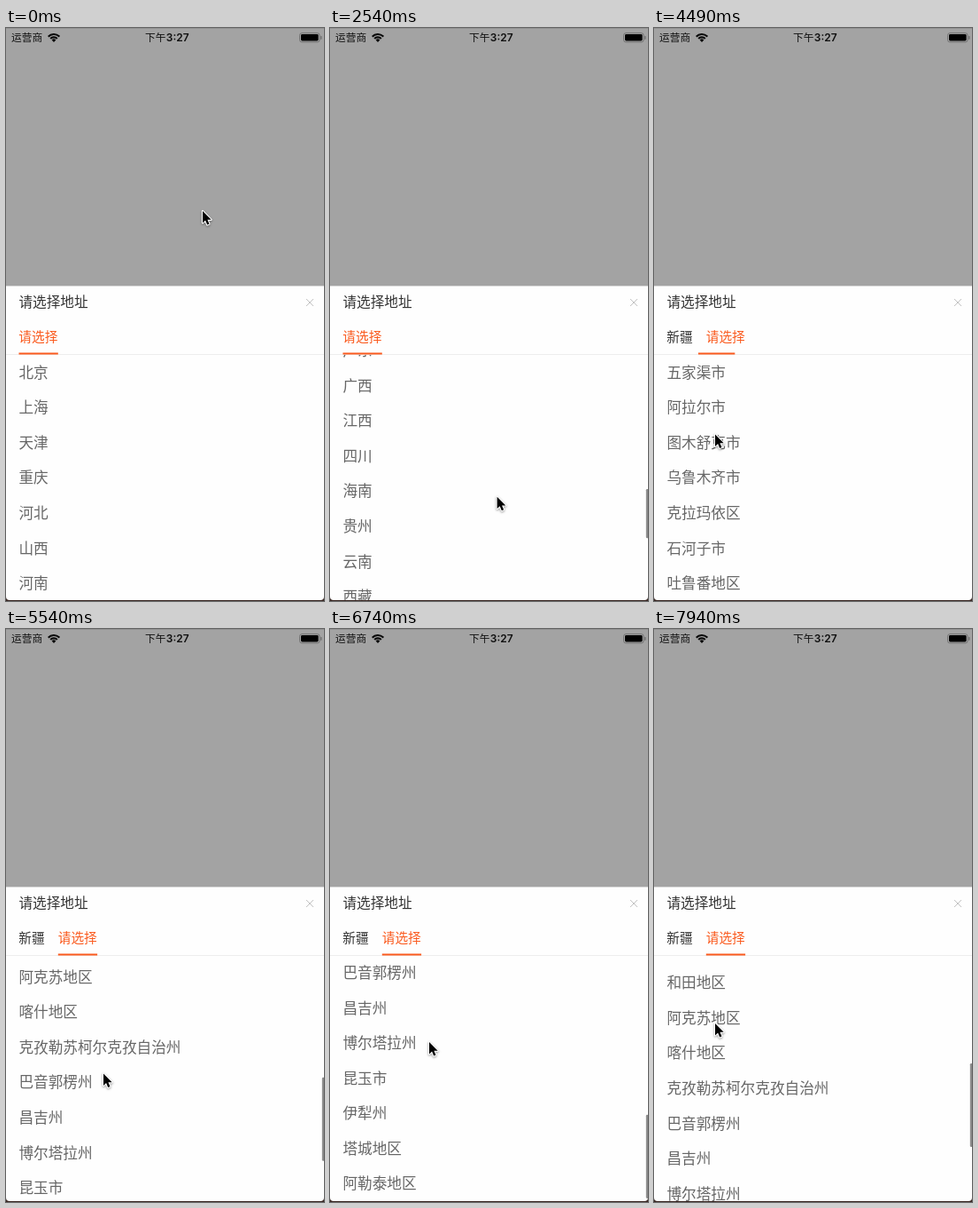
Recreate the animation shown at these times as an HTML page with a canvas. Size 359 px wide and 645 px high, loop 8000 ms.

```html
<!DOCTYPE html>
<html lang="zh-CN">
<head>
<meta charset="utf-8">
<title>请选择地址</title>
<style>
html, body { margin: 0; width: 100%; height: 100%; overflow: hidden; background: #3a2824; }
canvas { display: block; width: 359px; height: 645px; }
</style>
</head>
<body>
<canvas id="stage" width="359" height="645"></canvas>
<script>
const W = 359, H = 645, LOOP = 8000, ROW = 39.55;
const LIST_TOP = 368, LIST_BOTTOM = 644, VIEW = LIST_BOTTOM - LIST_TOP;
const ORANGE = '#fa5a1e', DARK = '#333', GRAY = '#666', INK = '#0a0a0a';
const CJK = '"Noto Sans CJK SC", "Noto Sans CJK", "Noto Sans", sans-serif';
const LATIN = 'Inter, sans-serif';
const ctx = document.getElementById('stage').getContext('2d');

const provinces = ('北京 上海 天津 重庆 河北 山西 河南 辽宁 吉林 黑龙江 内蒙古 江苏 山东 安徽 浙江 福建 湖北 湖南 ' +
  '广东 广西 江西 四川 海南 贵州 云南 西藏 陕西 甘肃 青海 宁夏 新疆 台湾 钓鱼岛 港澳').split(' ');
const cities = ('五家渠市 阿拉尔市 图木舒克市 乌鲁木齐市 克拉玛依区 石河子市 吐鲁番地区 铁门关市 哈密地区 和田地区 ' +
  '阿克苏地区 喀什地区 克孜勒苏柯尔克孜自治州 巴音郭楞州 昌吉州 博尔塔拉州 昆玉市 伊犁州 塔城地区 阿勒泰地区').split(' ');

const clamp = v => Math.max(0, Math.min(1, v));
const ease = v => { v = clamp(v); return v * v * (3 - 2 * v); };
const span = (t, from, length) => clamp((t - from) / length);
const maxScroll = items => items.length * ROW - VIEW;

// A swipe that starts fast and coasts to rest
const flick = (t, from, length, distance) => distance * (1 - (1 - span(t, from, length)) ** 2);

function provinceScroll(t) {
  const first = 451;
  return flick(t, 900, 900, first) + flick(t, 2300, 900, maxScroll(provinces) - first);
}

function cityScroll(t) {
  const bounce = 7;
  return flick(t, 4940, 1200, maxScroll(cities) + bounce) - flick(t, 6140, 300, bounce) -
    flick(t, 6800, 1200, 170);
}

// Pointer stops: [time, x, y]
const stops = [
  [300, 222, 206], [900, 198, 550], [1640, 195, 468], [2300, 192, 550], [2990, 180, 470],
  [3440, 51, 520], [3740, 51, 507], [4040, 51, 507], [4490, 69, 457.5], [4940, 105, 550],
  [6140, 115, 451], [7340, 109, 479], [7940, 69, 444]
];

function pointerAt(t) {
  const next = stops.findIndex(s => s[0] >= t);
  if (next < 1) return stops[0].slice(1);
  const [t0, x0, y0] = stops[next - 1], [t1, x1, y1] = stops[next];
  const p = ease((t - t0) / (t1 - t0));
  return [x0 + (x1 - x0) * p, y0 + (y1 - y0) * p];
}

function snap(t) {
  const start = t < 1340 ? 0 : 1340;
  return start + Math.floor((t - start) / 150) * 150;
}

function rect(x, y, w, h, color) {
  ctx.fillStyle = color;
  ctx.fillRect(x, y, w, h);
}

function pill(x, y, w, h, r, color) {
  ctx.beginPath();
  ctx.roundRect(x, y, w, h, r);
  ctx.fillStyle = color;
  ctx.fill();
}

function text(str, x, midY, size, color, weight = 400, font = CJK) {
  ctx.font = `${weight} ${size}px ${font}`;
  ctx.fillStyle = color;
  ctx.fillText(str, x, midY + size * 0.35);
  return ctx.measureText(str).width;
}

function drawWifi(x, y) {
  const arc = r => ctx.arc(x, y, r, -Math.PI * 0.76, -Math.PI * 0.24);
  ctx.strokeStyle = ctx.fillStyle = INK;
  ctx.lineWidth = 2.1;
  for (const r of [5.2, 8.6]) {
    ctx.beginPath();
    arc(r);
    ctx.stroke();
  }
  ctx.beginPath();
  ctx.moveTo(x, y + 0.4);
  arc(3.2);
  ctx.fill();
}

function drawStatus() {
  text('运营商', 6, 11, 11.7, '#111');
  const w = text('下午', 157, 11, 11.7, '#111', 500);
  text('3:27', 157.4 + w, 11, 12, '#111', 600, LATIN);
  drawWifi(54, 15.6);
  ctx.lineWidth = 0.9;
  ctx.strokeStyle = '#6e6e6e';
  ctx.beginPath();
  ctx.roundRect(331.5, 5.7, 22.6, 10.2, 2.6);
  ctx.stroke();
  pill(333, 7.1, 19.6, 7.4, 1.4, '#000');
  pill(355.2, 9, 1.3, 3.8, 0.6, '#6e6e6e');
}

function drawList(items, scroll, dx) {
  items.forEach((name, i) => {
    const y = 388 + i * ROW - scroll;
    if (y > LIST_TOP - 20 && y < LIST_BOTTOM + 20) text(name, 14.4 + dx, y, 16.65, GRAY);
  });
}

function drawBar(items, scroll, alpha) {
  const content = items.length * ROW, track = 270;
  const h = track * VIEW / content - Math.max(0, scroll - maxScroll(items));
  const y = Math.min(371 + scroll / content * track, 641 - h);
  pill(356.8, y, 2.9, h, 1.4, `rgba(0,0,0,${0.46 * alpha})`);
}

function drawTabs(t) {
  const chosen = t >= 4190;
  const p = chosen ? ease((t - 4276) / 300) : 0;
  if (chosen) text('新疆', 14.3, 348, 14.7, DARK);
  text('请选择', chosen ? 58.7 : 14.3, 348, 14.7, ORANGE);
  rect(0, 367, W, 1, '#ededed');
  rect(14.5 + 44.3 * p, 365.5, (chosen ? 29.5 : 44.3) + 14.8 * p, 2, ORANGE);
}

function drawClose(x, y, r) {
  ctx.strokeStyle = '#bdbdbd';
  ctx.lineWidth = 0.9;
  ctx.beginPath();
  for (const s of [-1, 1]) {
    ctx.moveTo(x - r, y - r * s);
    ctx.lineTo(x + r, y + r * s);
  }
  ctx.stroke();
}

function drawPointer(x, y) {
  ctx.save();
  ctx.translate(x, y);
  ctx.lineJoin = 'round';
  ctx.lineWidth = 2.2;
  ctx.strokeStyle = '#fff';
  ctx.shadowColor = 'rgba(0,0,0,.4)';
  ctx.shadowBlur = 2.5;
  ctx.shadowOffsetY = 1;
  const arrow = new Path2D('M0 0V13.4L3.1 10.6L5.2 15.6L7.5 14.6L5.4 9.8H9.7Z');
  ctx.stroke(arrow);
  ctx.shadowColor = 'transparent';
  ctx.fill(arrow);
  ctx.restore();
}

function drawLists(t) {
  const slide = ease((t - 4110) / 310);
  const first = provinceScroll(t), second = cityScroll(t);
  ctx.save();
  ctx.beginPath();
  ctx.rect(0, LIST_TOP, W, VIEW);
  ctx.clip();
  if (slide < 1) drawList(provinces, first, -W * slide);
  if (slide > 0) drawList(cities, second, W * (1 - slide));
  if (t > 900 && t < 3440) drawBar(provinces, first, 1 - span(t, 3200, 240));
  if (t > 4940) drawBar(cities, second, 1);
  ctx.restore();
}

function draw(t) {
  rect(0, 0, W, H, '#3a2824');
  ctx.save();
  ctx.beginPath();
  ctx.roundRect(0, 0, W, 644, [0, 0, 4, 4]);
  ctx.clip();
  rect(0, 0, W, 291, '#a3a3a3');
  rect(0, 0, W, 1, '#929292');
  rect(0, 290.4, W, 355, '#fefefe');
  drawStatus();
  text('请选择地址', 14.4, 309, 15.65, DARK, 500);
  drawClose(343, 309, 4);
  drawLists(t);
  drawTabs(t);
  ctx.restore();
  ctx.fillStyle = '#000';
  drawPointer(...pointerAt(t));
}

const start = performance.now();
function tick() {
  draw(snap((performance.now() - start) % LOOP));
  requestAnimationFrame(tick);
}
tick();
</script>
</body>
</html>
```
